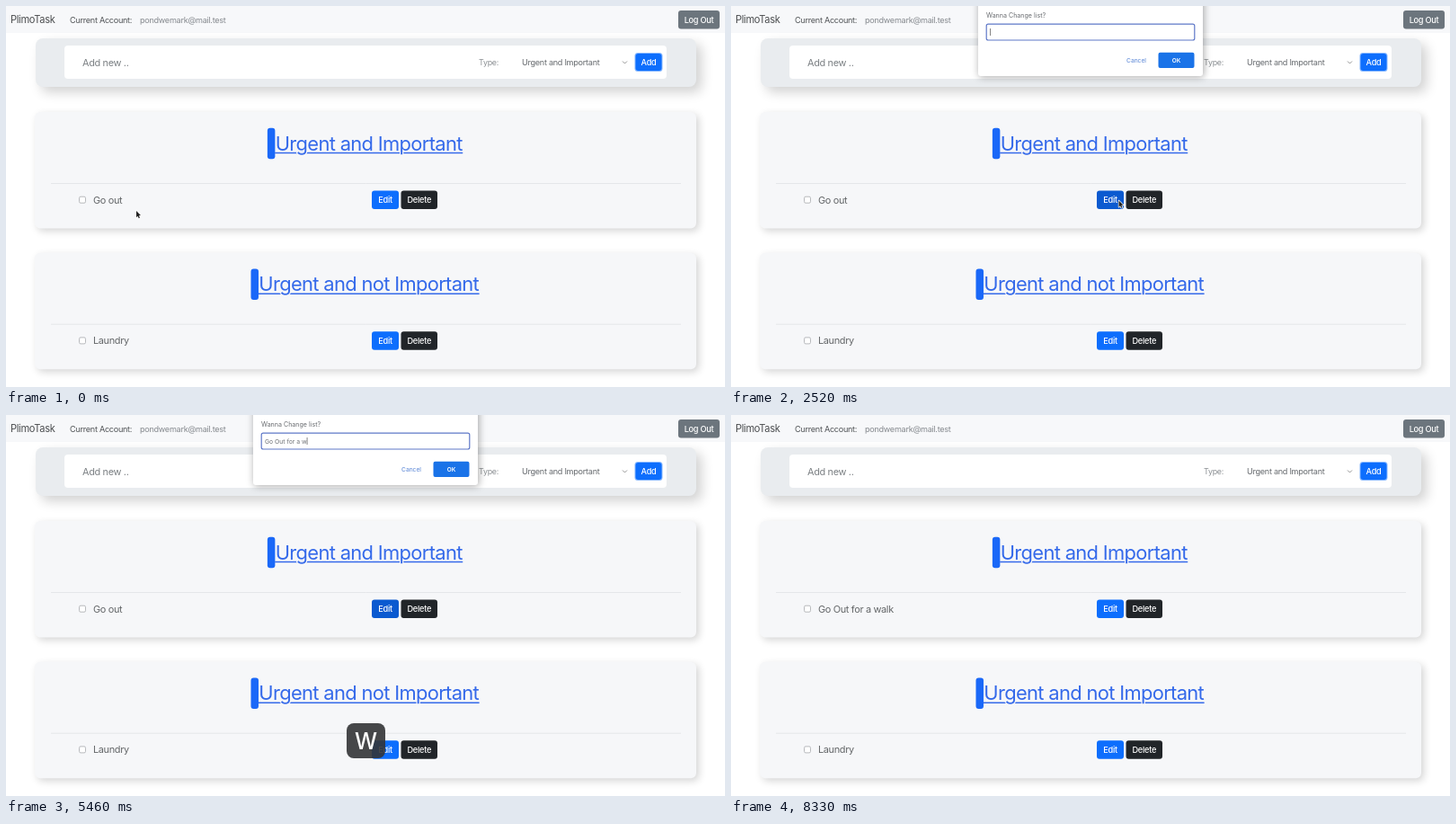
Recreate the animation shown at these times as an HTML page with a canvas. Size 800x424 px, loop 8400 ms.

```html
<!DOCTYPE html>
<html lang="en">
<head>
<meta charset="utf-8">
<title>To-do list</title>
<style>
html, body { margin: 0; width: 100%; height: 100%; overflow: hidden; background: #fff; }
canvas { display: block; width: 800px; height: 424px; }
</style>
</head>
<body>
<canvas id="stage" width="800" height="424"></canvas>
<script>
const ctx = document.getElementById('stage').getContext('2d');
const LOOP = 8400;
const BLUE = '#0d6efd';

// Moments of the session, in ms
const HOVER_EDIT = 1190, CLICK_EDIT = 1400, OPEN = 1470;
const HOVER_OK = 6160, CLICK_OK = 6300, CLOSE = 6440, CLEAR = 6580, LOADED = 7280;

const TYPED = 'Go Out for a walk';
const KEY_TIMES = [2870, 3150, 3430, 3710, 3800, 3900, 4060, 4210, 4380, 4550,
  4830, 5040, 5220, 5430, 5600, 5780, 5950];

// Pointer stops: time, x, y
const PATH = [
  [0, 145, 228], [280, 145, 228], [1250, 431.5, 216.5], [4340, 431.5, 216.5],
  [4620, 374, 177], [5960, 374, 177], [6280, 505, 56], [6510, 505, 56],
  [6860, 396, 104], [7490, 396, 104], [8080, 415, -16], [LOOP, 415, -16]
];

const clamp = v => Math.max(0, Math.min(1, v));
const ease = v => v * v * (3 - 2 * v);

function box(x, y, w, h, r, fill, stroke, lineWidth = 1) {
  ctx.beginPath();
  ctx.roundRect(x, y, w, h, r);
  if (fill) { ctx.fillStyle = fill; ctx.fill(); }
  if (stroke) { ctx.strokeStyle = stroke; ctx.lineWidth = lineWidth; ctx.stroke(); }
}

function shadowed(offset, blur, color, draw) {
  ctx.save();
  ctx.shadowOffsetX = ctx.shadowOffsetY = offset;
  ctx.shadowBlur = blur;
  ctx.shadowColor = color;
  draw();
  ctx.restore();
}

function setFont(size, weight = 400, tracking = -0.03) {
  ctx.font = `${weight} ${size}px Inter, Roboto, sans-serif`;
  ctx.letterSpacing = `${size * tracking}px`;
}

function text(str, x, y, size, color, { weight, tracking, align = 'left' } = {}) {
  setFont(size, weight, tracking);
  ctx.textAlign = align;
  ctx.fillStyle = color;
  ctx.fillText(str, x, y);
}

function line(points, color, width) {
  ctx.beginPath();
  points.forEach(([x, y]) => ctx.lineTo(x, y));
  ctx.strokeStyle = color;
  ctx.lineWidth = width;
  ctx.stroke();
}

function button(label, x, y, w, h, fill, size = 9.2) {
  box(x, y, w, h, 3, fill);
  text(label, x + w / 2, y + h / 2 + 3.4, size, '#fff', { weight: 500, align: 'center' });
}

function header() {
  box(0, 0, 800, 30, 0, '#f7f8fa');
  text('PlimoTask', 5, 19, 11.1, '#4c4e50');
  text('Current Account:', 71, 18.5, 9.1, '#505356');
  text('pondwemark@mail.test', 149, 18.5, 9.1, '#85898e');
  button('Log Out', 748, 5, 46, 20.5, '#6c757d');
}

function addPanel() {
  shadowed(6, 13, 'rgba(0,0,0,.18)', () => box(33, 36, 735, 54, 8, '#e9ecef'));
  box(65, 44, 670, 37, 4, '#fff');
  text('Add new ..', 85, 67, 10.9, '#7c8084');
  text('Type:', 526, 66, 8.9, '#8a8e92');
  text('Urgent and Important', 574, 66, 9.1, '#666a6e');
  line([[686, 61.5], [688.5, 64], [691, 61.5]], '#8a8a8a', 0.9);
  box(699.5, 52, 31, 21, 3.5, '#86b7fe');
  button('Add', 700.5, 53, 29, 19, BLUE);
}

function heading(title, y) {
  setFont(21.9);
  ctx.textAlign = 'left';
  const width = ctx.measureText(title).width;
  const x = 403.7 - width / 2;
  const blue = '#3469ea';
  box(x - 8.8, y, 8.5, 34.5, 3, '#1a68f8');
  line([[x - 0.5, y + 27.8], [x + width + 0.5, y + 27.8]], blue, 1.5);
  // Clear the underline around descenders
  ctx.strokeStyle = '#f6f7f9';
  ctx.lineWidth = 2.4;
  ctx.lineJoin = 'round';
  ctx.strokeText(title, x, y + 25);
  ctx.fillStyle = blue;
  ctx.fillText(title, x, y + 25);
}

function card(title, y, item, editColor) {
  const h = item ? 129.5 : 93.5;
  shadowed(3, 8, 'rgba(0,0,0,.17)', () => box(32, y, 736, h, 6, '#f6f7f9'));
  heading(title, y + 17.7);
  line([[50, y + 79.5], [751, y + 79.5]], '#e4e6e9', 1);
  if (!item) return;
  const mid = y + 97.7;
  box(81.5, mid - 3.5, 7, 7, 1.5, '#fff', '#b0b3b6', 0.9);
  text(item, 97, mid + 4, 10.9, '#646769');
  button('Edit', 407, mid - 10.2, 30, 20.5, editColor);
  button('Delete', 439.5, mid - 10.2, 40.5, 20.5, '#212529');
}

function cards(t) {
  const empty = t >= CLEAR && t < LOADED;
  const step = empty ? 121 : 156.7;
  const first = t < CLEAR ? 'Go out' : TYPED;
  const edit = t >= HOVER_EDIT && t < CLEAR ? '#0b5ad0' : BLUE;
  card('Urgent and Important', 118, !empty && first, edit);
  card('Urgent and not Important', 118 + step, !empty && 'Laundry', BLUE);
  if (empty) card('Not Urgent and Important', 118 + 2 * step, null, BLUE);
}

function dialog(t) {
  if (t < OPEN || t >= CLOSE) return;
  const blue = '#1a73e8';
  shadowed(1, 8, 'rgba(0,0,0,.35)', () => box(275, -10, 250, 88, 3, '#fff'));
  text('Wanna Change list?', 284, 13, 7.1, '#66696d', { tracking: 0 });
  box(284.2, 20.2, 231.6, 17.8, 2, '#fff', '#5f78c8', 1.2);

  const count = KEY_TIMES.filter(k => k <= t).length;
  const typed = TYPED.slice(0, count);
  text(typed, 288, 31.5, 6.8, '#707377', { tracking: 0 });
  const idle = t - (count ? KEY_TIMES[count - 1] : OPEN);
  if (!typed.endsWith(' ') && idle % 1000 < 500) {
    const x = 288.5 + ctx.measureText(typed).width;
    line([[x, 25], [x, 33]], '#666', 0.8);
  }

  text('Cancel', 451, 62.5, 6.6, '#6a92da', { weight: 500, tracking: 0, align: 'center' });
  box(475.5, 51.7, 40, 17.3, 2, t >= HOVER_OK ? '#4a7fd6' : blue);
  text('OK', 495.5, 62.8, 6.5, '#fff', { weight: 600, tracking: 0, align: 'center' });
}

function keyCap(t) {
  const count = KEY_TIMES.filter(k => k <= t).length;
  if (!count) return;
  const key = TYPED[count - 1].toUpperCase();
  const age = t - KEY_TIMES[count - 1];
  const alpha = 1 - clamp((age - 310) / 280);
  if (!alpha) return;
  ctx.save();
  ctx.globalAlpha = alpha;
  const w = key === ' ' ? 51 : 43;
  box(400.5 - w / 2, 343, w, 39, 8, 'rgba(52,53,55,.9)');
  if (key === ' ') line([[392.5, 370], [392.5, 374], [408, 374], [408, 370]], '#fff', 1.6);
  else text(key, 400.5, 372, 25, '#fff', { weight: 500, tracking: 0, align: 'center' });
  ctx.restore();
}

function pointerAt(t) {
  const i = PATH.findIndex(p => p[0] > t);
  const [t0, x0, y0] = PATH[i - 1];
  const [t1, x1, y1] = PATH[i];
  const k = ease((t - t0) / (t1 - t0));
  return [x0 + (x1 - x0) * k, y0 + (y1 - y0) * k];
}

function ring(t, start, x, y) {
  const age = t - start;
  if (age < 0 || age > 280) return;
  const r = 6 + age * 0.07;
  ctx.save();
  ctx.globalAlpha = 1 - clamp((age - 140) / 140);
  box(x - r, y - r, 2 * r, 2 * r, r, null, 'rgba(110,150,205,.65)', 1.2);
  ctx.restore();
}

function pointer(t) {
  // Typing hides the pointer until the mouse moves again
  if ((t >= 2870 && t < 4340) || (t >= 4830 && t < 5960)) return;
  const [x, y] = pointerAt(t);
  ctx.save();
  ctx.translate(x, y);
  ctx.beginPath();
  [[0, 0], [0, 7.2], [1.6, 5.8], [2.7, 8.2], [3.9, 7.7], [2.9, 5.3], [5, 5.1]]
    .forEach(([px, py]) => ctx.lineTo(px, py));
  ctx.closePath();
  ctx.lineJoin = 'round';
  ctx.lineWidth = 1.4;
  ctx.strokeStyle = '#fff';
  ctx.stroke();
  ctx.fillStyle = '#222';
  ctx.fill();
  ctx.restore();
}

function draw(t) {
  ctx.fillStyle = '#fff';
  ctx.fillRect(0, 0, 800, 424);
  header();
  addPanel();
  cards(t);
  dialog(t);
  keyCap(t);
  ring(t, CLICK_EDIT, 431, 217);
  ring(t, CLICK_OK, 504, 56);
  pointer(t);
}

const start = performance.now();
function tick() {
  draw((performance.now() - start) % LOOP);
  requestAnimationFrame(tick);
}
tick();
</script>
</body>
</html>
```
